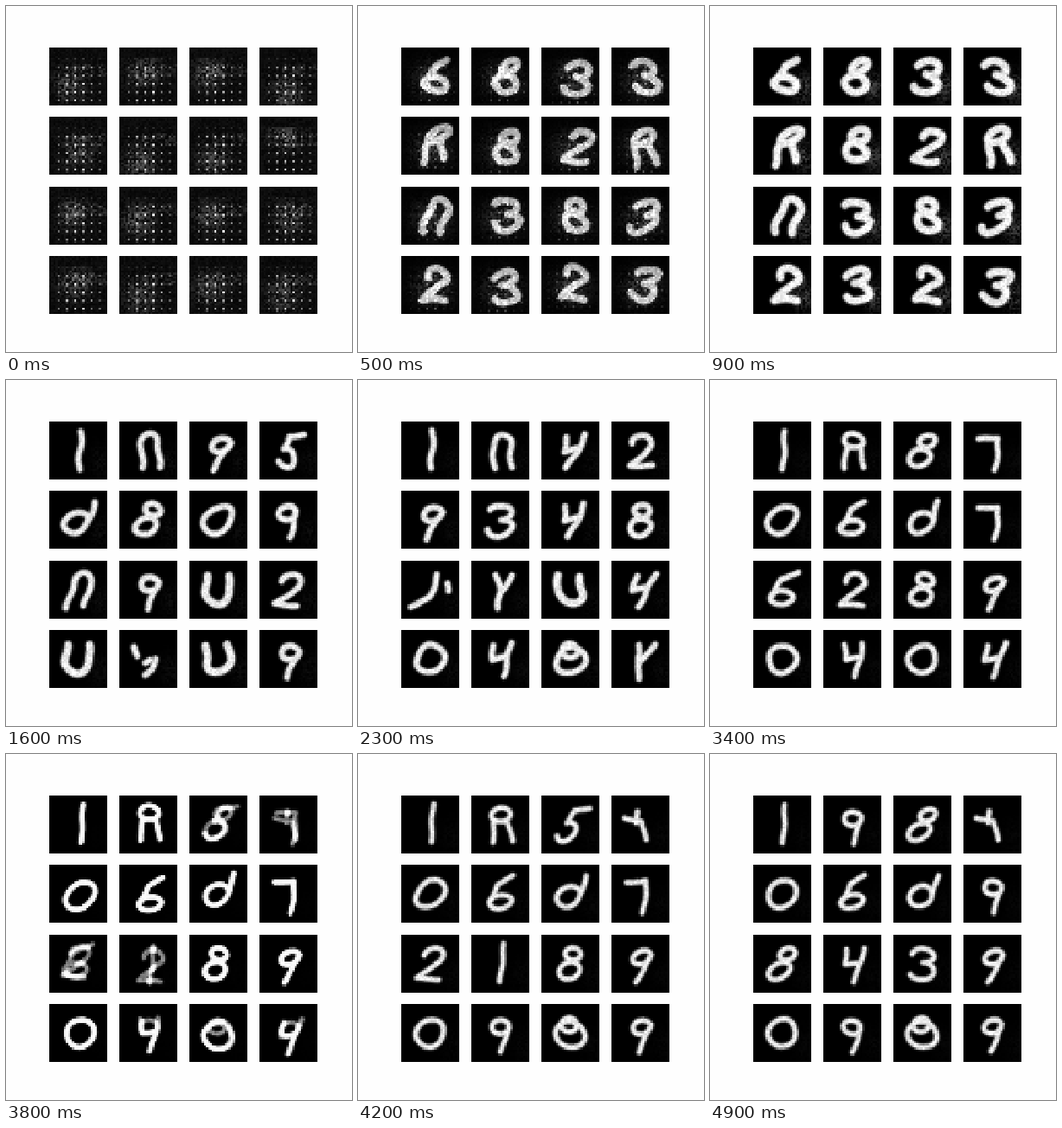
These frames come from a looping animation (400 px wide and 400 px high, 5000 ms). An HTML page with a canvas:

```html
<!DOCTYPE html>
<html lang="en">
<head>
<meta charset="utf-8">
<title>Generated digits</title>
<style>
html, body { margin: 0; width: 100%; height: 100%; overflow: hidden; background: #fefefe; }
canvas { display: block; width: 400px; height: 400px; }
</style>
</head>
<body>
<canvas id="stage" width="400" height="400"></canvas>
<script>
const LOOP = 5000, STEP = 100, N = 28, SIZE = 67;
const ctx = document.getElementById("stage").getContext("2d");
const cell = document.createElement("canvas");
cell.width = cell.height = N;
const pen = cell.getContext("2d", { willReadFrequently: true });

// Each pose names the glyph that every tile shows, row by row.
const poses = [
  { at: 9, width: 9, wobble: 2.6, shift: 5, haze: 0.3, text: "6833 A82A n383 2323" },
  { at: 16, width: 7, wobble: 1.6, shift: 0, haze: 0.06, text: "1n95 d809 n9U2 UwU9" },
  { at: 23, width: 7, wobble: 1.6, shift: 0, haze: 0.05, text: "1n42 9348 JYU4 04QY" },
  { at: 34, width: 6.5, wobble: 1.2, shift: 0, haze: 0.04, text: "1A87 06d7 6289 0404" },
  { at: 42, width: 6, wobble: 0.9, shift: 0, haze: 0.03, text: "1A5x 06d7 2189 09Q9" },
  { at: 49, width: 6, wobble: 0.9, shift: 0, haze: 0.03, text: "198x 06d9 8439 09Q9" }
];
const lean = [0.05, 0, 0.35, 0, 0.3, 0.15, 0.25, 0, 0.3, 0.1, 0, 0.3, 0.05, 0, 0, 0.15];

// Glyphs are built from arcs (in turns) and bent lines around the tile centre.
const glyphs = {
  0: (arc) => arc(0, 0, 16, 16),
  1: (arc, line) => line(2, -23, 2, 21),
  2: (arc, line) => { arc(2, -9, 11, 9, 0.5, 1.1); line(11, -4, -11, 17, 15, 18); },
  3: (arc) => { arc(0, -9, 13, 8, 0.55, 1.25); arc(0, 9, 14, 10, -0.25, 0.45); },
  4: (arc, line) => { line(-9, -16, -8, 1, 8, -2); line(12, -18, 8, 5, 3, 21); },
  5: (arc, line) => { line(17, -18, 0, -17, -4, -4); arc(-2, 8, 10, 11, -0.3, 0.42); },
  6: (arc, line) => { line(12, -21, -4, -11, -11, 9); arc(1, 9, 13, 8); },
  7: (arc, line) => line(-15, -13, 7, -15, 6, 1, 3, 22),
  8: (arc) => { arc(3, -11, 9, 7); arc(-1, 8, 12, 10); },
  9: (arc, line) => { arc(0, -7, 10, 8); line(10, -10, 6, 6, 1, 22); },
  A: (arc, line) => { arc(1, -11, 11, 8); line(-7, -3, -9, 21); line(9, -3, 14, 19); },
  n: (arc, line) => { arc(2, -8, 10, 11, 0.5, 1); line(-8, -8, -7, 21); line(12, -8, 13, 19); },
  U: (arc, line) => { arc(0, 2, 14, 14, 0, 0.5); line(-14, 2, -14, -16); line(14, 2, 11, -16); },
  Y: (arc, line) => { line(-6, -17, 0, 4, 0, 22); line(13, -16, 0, 4); },
  J: (arc, line) => { line(4, -17, 2, 9, -15, 19); line(17, -7, 20, 1); },
  d: (arc, line) => { arc(-1, 3, 13, 12); line(13, -21, 12, 4); },
  Q: (arc) => { arc(0, 2, 17, 15); arc(-1, -9, 9, 8); },
  w: (arc, line) => { line(-15, -13, -13, -3); line(-5, 4, 1, 0); line(8, -1, 3, 11, -3, 18); },
  x: (arc, line) => { line(-18, -8, 2, -3, 6, 18); line(-4, -15, -4, -2); }
};

function rand(a, b, c = 0) {
  let h = Math.imul(a + 11, 374761393) ^ Math.imul(b + 7, 668265263) ^ Math.imul(c + 3, 974711);
  h = Math.imul(h ^ (h >>> 13), 1274126177);
  return ((h ^ (h >>> 16)) >>> 0) / 4294967296;
}

const bell = (x, y, s) => Math.exp(-(x * x + y * y) / (2 * s * s));
const field = (value) => Float32Array.from({ length: N * N }, (_, i) => value(i % N, (i / N) | 0, i));

// Untrained picture: a lattice of bright cells in a grey haze.
function dots(tile) {
  const gx = 8 + 7 * rand(tile, 1), gy = 8 + 14 * rand(tile, 2);
  return field((x, y, i) => {
    const r = rand(i, tile);
    let v = 0.02 + 0.05 * r;
    if (y > 4) v += 0.33 * r * bell(x - gx, y - gy, 5);
    if (y > 7 && y < 14 && x > 10) v += 0.12 * r * r;
    if (y > 4 && x > 3 && x % 4 === 0 && y % 4 === 1) {
      v = (y === 5 ? 0.35 : 1) * (0.25 + 0.65 * bell(x - 13, (y - 17) / 2, 6)) * (0.75 + 0.4 * r);
    } else if (y > 8 && x > 7 && x < 18 && x % 4 === 0 && y % 4 === 2) {
      v += 0.25 * r;
    }
    return Math.min(v, 1);
  });
}

function glyphPath(name, tile, pose, seed) {
  const path = new Path2D();
  const phase = 6.3 * rand(tile, seed, 9);
  const put = (x, y, first) => {
    const px = SIZE / 2 + pose.shift + x - lean[tile] * y + pose.wobble * Math.sin(y / 6 + phase);
    const py = SIZE / 2 + y + pose.wobble * 0.7 * Math.sin(x / 7 + phase * 2);
    first ? path.moveTo(px, py) : path.lineTo(px, py);
  };
  const arc = (x, y, rx, ry, from = 0, to = 1) => {
    for (let i = 0; i <= 24; i++) {
      const a = 2 * Math.PI * (from + (to - from) * i / 24);
      put(x + rx * Math.cos(a), y + ry * Math.sin(a), i === 0);
    }
  };
  const line = (...p) => {
    put(p[0], p[1], true);
    for (let k = 2; k < p.length; k += 2) {
      for (let i = 1; i <= 8; i++) {
        const f = i / 8;
        put(p[k - 2] + (p[k] - p[k - 2]) * f, p[k - 1] + (p[k + 1] - p[k - 1]) * f);
      }
    }
  };
  glyphs[name](arc, line);
  return path;
}

function strokes(name, tile, pose, seed) {
  const path = glyphPath(name, tile, pose, seed);
  const width = pose.width + (name === "U" ? 2 : 0);
  pen.setTransform(1, 0, 0, 1, 0, 0);
  pen.fillStyle = "#000";
  pen.fillRect(0, 0, N, N);
  pen.scale(N / SIZE, N / SIZE);
  pen.lineCap = pen.lineJoin = "round";
  for (const [w, alpha] of [[width + 2, 0.35], [width - 0.8, 0.95]]) {
    pen.lineWidth = w;
    pen.strokeStyle = `rgba(255,255,255,${alpha})`;
    pen.stroke(path);
  }
  const px = pen.getImageData(0, 0, N, N).data;
  return field((x, y, i) => {
    const r = rand(i, tile, seed);
    const fog = pose.haze * r * bell(x - 24, (y - 19) * 0.7, 3.5);
    return Math.min(1, px[i * 4] / 255 * (0.88 + 0.16 * r) + fog);
  });
}

const keys = [{ at: 0, tiles: lean.map((_, t) => dots(t)) }];
poses.forEach((pose, k) => keys.push({
  at: pose.at,
  tiles: [...pose.text.replaceAll(" ", "")].map((name, t) => strokes(name, t, pose, k + 1))
}));

function drawTile(tile, frame) {
  const k = Math.max(1, keys.findIndex(q => q.at >= frame));
  const a = keys[k - 1], b = keys[k];
  const p = (frame - a.at) / (b.at - a.at);
  const mid = Math.sin(Math.PI * p);
  const nudge = (c) => Math.round((rand(tile, frame, c) - 0.5) * 2.2 * mid);
  const dx = nudge(5), dy = nudge(6);
  const clamp = (n) => Math.min(N - 1, Math.max(0, n));
  const img = pen.createImageData(N, N);
  field((x, y, i) => {
    const j = clamp(y + dy) * N + clamp(x + dx);
    let v = a.tiles[tile][j] * (1 - p) + b.tiles[tile][j] * p;
    // Sharpen the blend so that strokes grow and shrink instead of fading.
    const s = Math.min(1, Math.max(0, (v - 0.15) / 0.6));
    v += (s * s * (3 - 2 * s) - v) * mid * 0.75;
    if (k === 1) v += 0.25 * mid * rand(i, frame, tile) * bell(x - 14, y - 15, 6);
    img.data.fill(Math.min(255, Math.round(v * 255)), i * 4, i * 4 + 3);
    img.data[i * 4 + 3] = 255;
    return v;
  });
  pen.putImageData(img, 0, 0);
  const left = 50 + 81 * (tile % 4), top = Math.round(48 + 80.4 * (tile >> 2));
  ctx.drawImage(cell, left, top, SIZE, SIZE);
}

let shown = -1;
const start = performance.now();

function draw() {
  const frame = Math.floor((performance.now() - start) % LOOP / STEP);
  if (frame !== shown) {
    shown = frame;
    ctx.imageSmoothingEnabled = false;
    ctx.fillStyle = "#fefefe";
    ctx.fillRect(0, 0, 400, 400);
    for (let t = 0; t < 16; t++) drawTile(t, frame);
  }
  requestAnimationFrame(draw);
}
draw();
</script>
</body>
</html>
```
